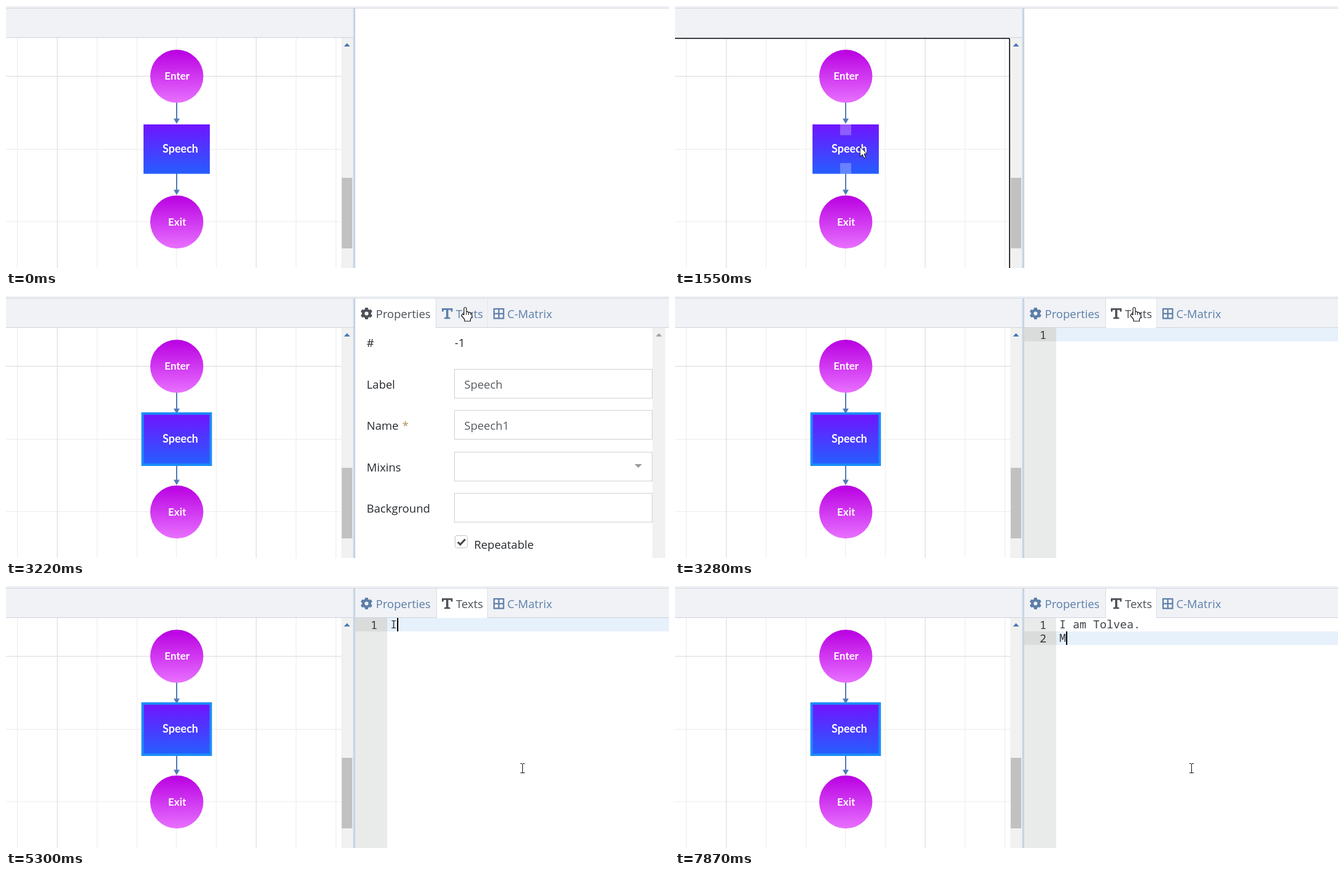
These frames come from a looping animation (1080 px wide and 427 px high, 8 s). An HTML page with a canvas:

```html
<!DOCTYPE html>
<html lang="en">
<head>
<meta charset="utf-8">
<title>Flow editor</title>
<style>
  html, body { margin: 0; width: 100%; height: 100%; overflow: hidden; background: #fff; }
  canvas { display: block; }
</style>
</head>
<body>
<canvas id="stage" width="1080" height="427"></canvas>
<script>
const ctx = document.getElementById('stage').getContext('2d');
const LOOP = 8000;
const UI = '18.5px "Open Sans", sans-serif';
const MONO = '18.33px "Noto Sans Mono", monospace';
const BAR = '#f0f2f6', EDGE = '#cdd4dc', LINK = '#5c7ea8';

const TYPED = 'I am Tolvea.\nM';
const KEY_TIMES = [5300, 5460, 5610, 5700, 5800, 6310, 6480, 6550, 6710, 6790, 6860, 7020, 7320, 7870];

// Pointer moves: start, end, target x, target y
const MOVES = [
  [620, 930, 301, 229], [1942, 2810, 768, 40], [2812, 2965, 748, 18],
  [3520, 3840, 788, 118], [4302, 4690, 841, 297]
];
const CLICKS = [[1400, 1550], [3040, 3200], [4070, 4150]];
const within = (t, a, b) => t >= a && t < b;

function box(x, y, w, h, color) {
  ctx.fillStyle = color;
  ctx.fillRect(x, y, w, h);
}
function frame(x, y, w, h, color, width = 1) {
  ctx.strokeStyle = color;
  ctx.lineWidth = width;
  ctx.strokeRect(x, y, w, h);
}
function text(str, x, y, color, font = UI, align = 'left') {
  ctx.font = font;
  ctx.textAlign = align;
  ctx.fillStyle = color;
  ctx.fillText(str, x, y);
}
function polygon(points, fill, stroke) {
  ctx.beginPath();
  for (let i = 0; i < points.length; i += 2) ctx.lineTo(points[i], points[i + 1]);
  ctx.closePath();
  ctx.fillStyle = fill;
  ctx.fill();
  if (stroke) {
    ctx.strokeStyle = stroke;
    ctx.lineWidth = 1;
    ctx.stroke();
  }
}
function disc(x, y, r, fill) {
  ctx.beginPath();
  ctx.arc(x, y, r, 0, 2 * Math.PI);
  ctx.fillStyle = fill;
  ctx.fill();
}
function gradient(y0, y1, from, to) {
  const g = ctx.createLinearGradient(0, y0, 0, y1);
  g.addColorStop(0, from);
  g.addColorStop(1, to);
  return g;
}

function pointerAt(t) {
  let x = 355, y = 401;
  for (const [start, end, tx, ty] of MOVES) {
    if (t < start) break;
    const steps = Math.round((end - start) / 78);
    const u = Math.min(1, Math.floor((t - start) / (end - start) * steps + 0.02) / steps);
    const e = u * u * (3 - 2 * u);
    x += (tx - x) * e;
    y += (ty - y) * e;
  }
  return { x, y };
}

function drawGrid() {
  for (let i = 0; i < 9; i++) {
    if (i % 5 !== 1) box(Math.round(18 + 64.85 * i), 52, 1, 375, '#ececec');
  }
  for (const y of [233, 351]) box(0, y, 546, 1, '#ececec');
  for (const x of [83, 407]) box(x, 52, 1, 375, '#d9d9d9');
  box(0, 114, 546, 1, '#d9d9d9');
}
function drawLink(y) {
  box(277, y, 2, 28, '#4f7ab8');
  polygon([273, y + 26.5, 283, y + 26.5, 278, y + 35], '#4f7ab8');
}
function drawRound(label, y) {
  disc(278.2, y, 43.3, gradient(y - 43, y + 43, '#b900e2', '#e870ff'));
  text(label, 278.7, y + 5.7, '#fff', 'bold 17px Lato, sans-serif', 'center');
}
function drawFlow(t, pointer) {
  drawGrid();
  drawLink(157);
  drawLink(273);
  drawRound('Enter', 114.5);
  drawRound('Exit', 352);
  box(224, 193, 108, 80.5, gradient(193, 273, '#7015ff', '#265dff'));
  if (t >= 1720) frame(222.5, 191.5, 111, 83.5, '#1a8cf5', 4);
  text('Speech', 284, 239, '#fff', 'bold 18px Lato, sans-serif', 'center');

  const { x, y } = pointer;
  if (t >= 620 && x > 224 && x < 332 && y > 193 && y < 273) {
    for (const py of [193, 256]) box(269, py, 18, 17.5, 'rgba(255,255,255,.27)');
  }
  box(546, 52, 20, 375, '#f1f1f1');
  box(547, 280, 17, 115, '#c1c1c1');
  polygon([550.5, 66, 560.5, 66, 555.5, 60.5], '#4878b4');
  if (within(t, 1400, 3040)) {
    ctx.beginPath();
    ctx.roundRect(-9, 52.7, 554, 400, 2);
    ctx.strokeStyle = '#101010';
    ctx.lineWidth = 1.7;
    ctx.stroke();
  }
}

function drawGear(x, y, color, hole) {
  ctx.save();
  ctx.translate(x, y);
  for (let i = 0; i < 6; i++) {
    polygon([-3.2, -6, -2.1, -9.6, 2.1, -9.6, 3.2, -6], color);
    ctx.rotate(Math.PI / 3);
  }
  ctx.restore();
  disc(x, y, 7.3, color);
  disc(x, y, 3.1, hole);
}
function drawTabs(textsActive, hover) {
  box(569, 4, 511, 47, BAR);
  box(569, 51, 511, 1, EDGE);
  const left = textsActive ? 701 : 569, right = textsActive ? 784 : 700;
  box(left, 4, right - left, 48, '#fff');
  box(right, 4, 1, 48, '#d8dee5');
  if (textsActive) box(left, 4, 1, 48, '#d8dee5');
  if (hover) box(784, 4, 1, 47, '#e1e6ec');

  const first = textsActive ? LINK : '#4b5157', second = textsActive ? '#4b5157' : LINK;
  drawGear(587.3, 28.5, first, textsActive ? BAR : '#fff');
  text('Properties', 602.5, 36, first);
  polygon([710, 20, 727.5, 20, 727.5, 25.5, 725, 25.5, 724.5, 22.8, 720.5, 22.8, 720.5, 34.6,
    723.5, 35, 723.5, 37.3, 714, 37.3, 714, 35, 717, 34.6, 717, 22.8, 713, 22.8, 712.5, 25.5, 710, 25.5], second);
  text('Texts', 733, 36, second);
  frame(795, 21, 15.5, 15.5, LINK, 2.2);
  box(801.7, 21, 2.2, 15, LINK);
  box(795, 27.7, 15, 2.2, LINK);
  text('C-Matrix', 816.5, 36, LINK);
}

function drawProperties() {
  const dark = '#25292e', soft = '#555b61';
  ['#', 'Label', 'Name', 'Mixins', 'Background'].forEach((label, i) => {
    const y = 83 + Math.round(67.5 * i);
    text(label, 587.5, y, dark);
    if (i) frame(730.5, y - 31.5, 322, 47, '#ccd1d6');
  });
  text('-1', 731, 83, dark);
  text('*', 645.5, 218, '#b48a58');
  text('Speech', 746.5, 151, soft);
  text('Speech1', 746.5, 218, soft);
  polygon([1024, 274, 1036, 274, 1030, 280], '#999');

  ctx.beginPath();
  ctx.roundRect(731.5, 390.5, 20, 20, 3);
  ctx.strokeStyle = '#bcc2c8';
  ctx.lineWidth = 1;
  ctx.stroke();
  ctx.beginPath();
  ctx.moveTo(736, 401);
  ctx.lineTo(740, 405);
  ctx.lineTo(748, 396.5);
  ctx.strokeStyle = '#444';
  ctx.lineWidth = 3;
  ctx.stroke();
  text('Repeatable', 762.5, 412, dark);

  box(1053, 52, 21, 375, '#f1f1f1');
  polygon([1058.5, 66, 1068.5, 66, 1063.5, 60.5], '#a3a3a3');
}

function drawEditor(t) {
  const count = KEY_TIMES.filter(k => t >= k).length;
  const lines = TYPED.slice(0, count).split('\n');
  const row = lines.length - 1, top = 52 + 22 * row;
  box(569, 52, 52, 375, '#e9ebeb');
  box(569, top, 52, 22, '#dadcdc');
  box(621, top, 459, 22, '#e7f1fc');
  lines.forEach((line, i) => {
    text(String(i + 1), 605, 70 + 22 * i, '#333', MONO, 'right');
    text(line, 626, 69 + 22 * i, '#3b3f43', MONO);
  });
  if (within(t, 4070, 4570) || t >= 5070) {
    box(626 + 11 * lines[row].length, top, 2, 22, '#000');
  }
}

function drawPointer(t, { x, y }) {
  if (t < 620) return;
  if (CLICKS.some(([a, b]) => within(t, a, b))) disc(x - 2, y - 1, 15, 'rgba(255,255,0,.5)');
  ctx.save();
  ctx.translate(Math.round(x), Math.round(y));
  if (x > 701 && y < 52) {
    ctx.beginPath();
    ctx.moveTo(-2, 13);
    ctx.lineTo(-2, 2);
    ctx.quadraticCurveTo(0, -1, 2, 2);
    ctx.lineTo(2, 8);
    ctx.quadraticCurveTo(4, 6.5, 5.5, 9);
    ctx.quadraticCurveTo(7.5, 7.5, 9, 10);
    ctx.quadraticCurveTo(11, 9, 11, 12);
    ctx.lineTo(11, 16);
    ctx.lineTo(8.5, 20);
    ctx.lineTo(8.5, 23);
    ctx.lineTo(-1, 23);
    ctx.lineTo(-1, 20);
    ctx.lineTo(-6, 14);
    ctx.quadraticCurveTo(-6, 10, -2, 13);
    ctx.fillStyle = '#fff';
    ctx.fill();
    ctx.strokeStyle = '#111';
    ctx.lineWidth = 1.2;
    ctx.stroke();
    for (const fx of [2, 5.5, 9]) box(fx - 0.5, 9, 1, 4, '#111');
  } else if (t >= 3280) {
    box(0, -7, 1, 15, '#111');
    for (const end of [-8, 7]) {
      box(-3, end, 3, 1, '#111');
      box(1, end, 3, 1, '#111');
    }
  } else {
    polygon([0.5, 0.5, 0.5, 16.5, 4.3, 13, 7, 19, 9.5, 18, 7, 12, 12, 12], '#fff', '#111');
  }
  ctx.restore();
}

function draw(t) {
  const pointer = pointerAt(t);
  box(0, 0, 1080, 427, '#fff');
  drawFlow(t, pointer);
  box(0, 0, 1080, 3, BAR);
  box(0, 4, 565, 47, BAR);
  box(0, 51, 566, 1, EDGE);
  if (t >= 1720) {
    const textsActive = t >= 3280;
    drawTabs(textsActive, pointer.x > 701 && pointer.y < 52);
    if (textsActive) drawEditor(t);
    else drawProperties();
  }
  box(0, 3, 1080, 1, '#d0d5db');
  box(565.5, 4, 3.5, 423, '#c8d5e3');
  drawPointer(t, pointer);
}

function tick() {
  draw(performance.now() % LOOP);
  requestAnimationFrame(tick);
}
tick();
</script>
</body>
</html>
```
